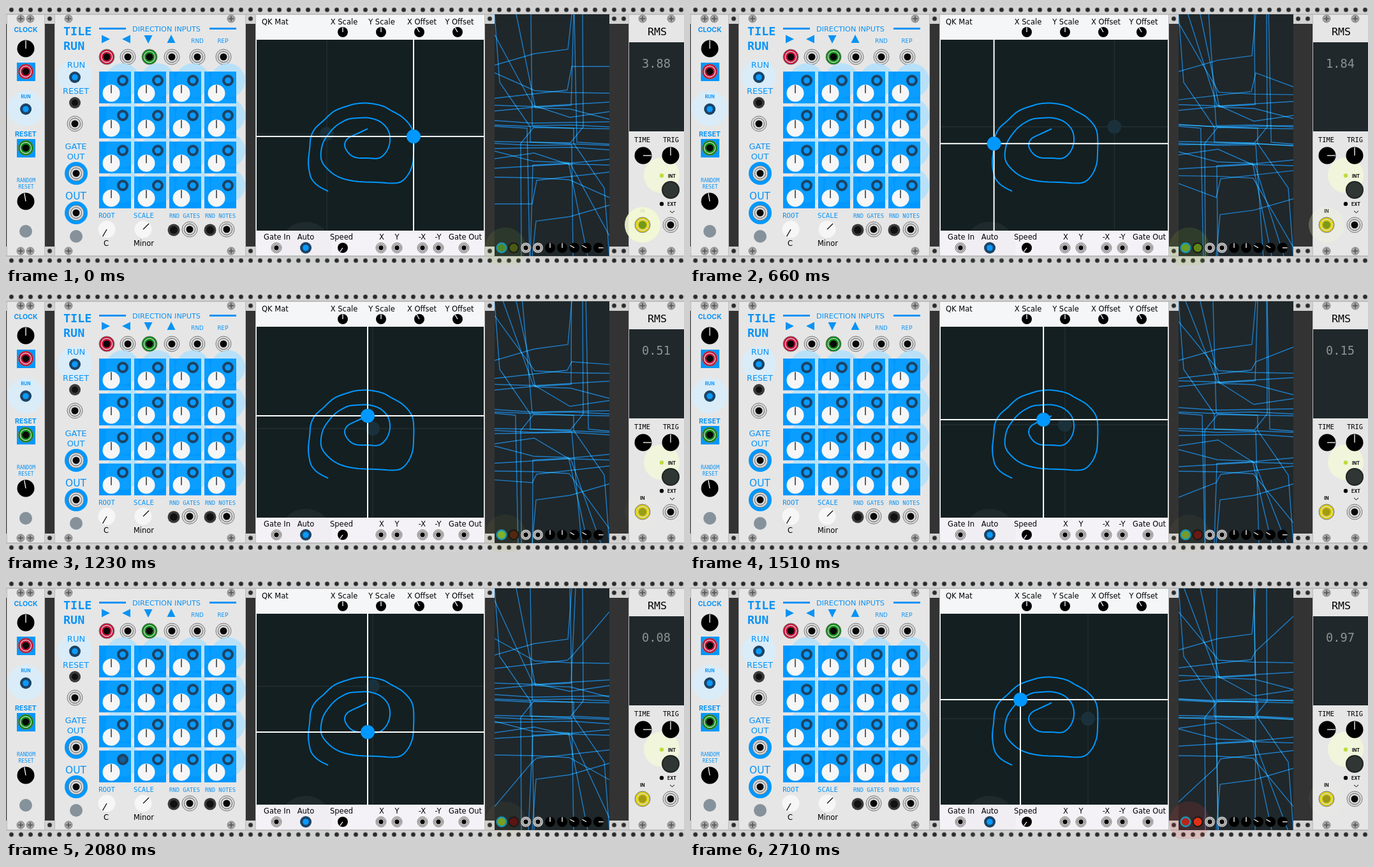
These frames come from a looping animation (1063x407 px, 2.81 s). An HTML page:

```html
<!DOCTYPE html>
<html lang="en">
<head>
<meta charset="utf-8">
<title>Modular rack</title>
<style>
html, body { margin: 0; width: 100%; height: 100%; overflow: hidden; background: #333; }
svg { display: block; width: 1063px; height: 407px; }
text { font-family: "DejaVu Sans", sans-serif; }
.mono { font-family: "DejaVu Sans Mono", monospace; }
.bold { font-weight: 700; }
.geo { font-family: Inter, sans-serif; font-weight: 700; }
#traces path { fill: none; stroke: #2094f0; stroke-width: 1.4; stroke-opacity: .78; mix-blend-mode: screen; }
#traces { isolation: isolate; }
</style>
</head>
<body>
<svg id="stage" viewBox="0 0 1063 407">
  <defs><clipPath id="scopeClip"><rect x="766" y="13" width="180" height="380"/></clipPath></defs>
</svg>
<script>
const NS = "http://www.w3.org/2000/svg";
const stage = document.getElementById("stage");
const BLUE = "#0098ff", INK = "#0a93f5", PANEL = "#e6e6e6";

// ---- drawing helpers ----
function el(tag, attrs, parent = stage) {
  const node = document.createElementNS(NS, tag);
  for (const k in attrs) node.setAttribute(k, attrs[k]);
  parent.appendChild(node);
  return node;
}
const rect = (x, y, width, height, fill) => el("rect", { x, y, width, height, fill });
const dot = (cx, cy, r, fill, more = {}) => el("circle", { cx, cy, r, fill, ...more });
const ring = (cx, cy, r, stroke, w = 1) => dot(cx, cy, r, "none", { stroke, "stroke-width": w });
const line = (x1, y1, x2, y2, stroke, w = 1) => el("line", { x1, y1, x2, y2, stroke, "stroke-width": w });

function label(str, x, y, size, fill = INK, cls = "", anchor = "middle") {
  const node = el("text", { x, y, fill, "font-size": size, class: cls, "text-anchor": anchor });
  node.textContent = str;
  return node;
}
function port(x, y, r = 12, fill = "#dcdcdc") {
  dot(x, y, r, fill, { stroke: "#777", "stroke-width": 1 });
  ring(x, y, r * .72, fill === "#dcdcdc" ? "#777" : "#ddd", 1.2);
  return dot(x, y, r * .46, "#080808");
}
function knob(x, y, r, deg, fill = "#000", hand = "#fff") {
  const a = deg * Math.PI / 180;
  dot(x, y, r, fill);
  line(x, y, x + Math.sin(a) * r * .95, y - Math.cos(a) * r * .95, hand, 1.3);
}
function led(x, y) {
  dot(x, y, 9, "#1c4364");
  return dot(x, y, 4.8, "#0a9aff");
}
function screw(x, y) {
  dot(x, y, 6, "#a3a3a3", { stroke: "#777", "stroke-width": .8 });
  line(x - 4, y, x + 4, y, "#555", 1.6);
  line(x, y - 4, x, y + 4, "#555", 1.6);
}
const glow = (x, y, r, fill, opacity) => dot(x, y, r, fill, { "fill-opacity": opacity });

// ---- rack ----
rect(0, 0, 1063, 407, "#333");
for (const [top, holes] of [[0, 6], [13, 20], [378, 385], [393, 400]]) {
  rect(0, top, 1063, 15, "#d2d2d2");
  for (let x = 8.5; x < 1063; x += 15) dot(x, holes, 3.6, "#2b2b2b", { stroke: "#999", "stroke-width": .6 });
}
line(0, 13, 1063, 13, "#a8a8a8");
line(0, 393, 1063, 393, "#a8a8a8");
function panel(x, w, fill = PANEL) {
  el("rect", { x: x + .5, y: 13.5, width: w - 1, height: 379, fill, stroke: "#bdbdbd" });
}

// ---- clock ----
panel(1, 60);
for (const y of [20, 385]) { screw(23, y); screw(38, y); }
label("CLOCK", 31, 41, 10.6, INK, "geo");
knob(31, 67, 13.5, 0);
rect(17, 89, 29, 29, BLUE);
port(31, 103, 12, "#c8143c");
glow(31, 161, 28, "#d8eefc", .85);
label("RUN", 31, 145, 7, INK, "geo");
led(31, 162);
label("RESET", 31, 205, 10.6, INK, "geo");
rect(17, 209, 29, 29, BLUE);
port(31, 223, 12, "#0c8a14");
label("RANDOM", 31.5, 277, 8, INK, "mono");
label("RESET", 31.5, 287, 8, INK, "mono");
knob(31, 307, 13.5, -10);
dot(31, 354, 10, "#86929b");

// ---- grid sequencer ----
panel(76, 300);
for (const y of [20, 385]) { screw(98, y); screw(353, y); }
label("TILE", 90, 46, 18.4, INK, "mono bold", "start");
label("RUN", 90, 69, 18.4, INK, "mono bold", "start");
label("DIRECTION INPUTS", 251.5, 40, 11.3);
line(146, 35.5, 188, 35.5, INK, 3);
line(319, 35.5, 361, 35.5, INK, 3);
[[156, 90], [189, -90], [223, 180], [259, 0]].forEach(([x, a]) =>
  el("path", { d: "M0-7L6.5 6H-6.5Z", fill: INK, transform: `translate(${x} 52) rotate(${a})` }));
label("RND", 300, 58, 8.8);
label("REP", 340, 58, 8.8);
port(158, 80, 12, "#c8143c");
port(225, 80, 12, "#0c8a14");
[191, 260, 300, 341].forEach(x => port(x, 80));

glow(108, 111, 27, "#d8eefc", .85);
label("RUN", 110, 97, 13);
led(108, 112);
label("RESET", 109.5, 138, 12.8);
dot(108, 152, 9, "#3a3a3a");
dot(108, 152, 5, "#111");
port(108, 185);
label("GATE", 109.5, 225, 13);
label("OUT", 109.5, 241, 13);
label("OUT", 109.5, 304, 15.4);
for (const y of [263, 325]) { dot(110, y, 18, BLUE); port(110, y); }
dot(110, 362, 10, "#86929b");

const cells = [];
for (let j = 0; j < 4; j++) for (let i = 0; i < 4; i++) cells.push([55 * i, 55 * j]);
cells.forEach(([x, y]) => glow(183 + x, 117 + y, 27, "#d8eefc", .8));
cells.forEach(([x, y]) => rect(146 + x, 103 + y, 50, 50, BLUE));
cells.forEach(([x, y]) => glow(183 + x, 117 + y, 27, "#30b4ff", .2));
const leds = cells.map(([x, y]) => {
  knob(165 + x, 137 + y, 13.5, 0, "#f6f6f6", "#111");
  return led(183 + x, 117 + y);
});
label("ROOT", 158, 333, 10.7, INK, "mono");
label("SCALE", 216, 333, 10.6, INK, "mono");
label("RND GATES", 280, 333, 8.9, INK, "mono");
label("RND NOTES", 336, 333, 8.9, INK, "mono");
knob(158, 351, 13.5, 210, "#f6f6f6", "#111");
knob(215, 351, 13.5, 45, "#f6f6f6", "#111");
label("C", 157, 377, 11.5, "#000");
label("Minor", 216, 377, 11.5, "#000");
for (const x of [263, 320]) { dot(x, 352, 9.5, "#3a3a3a"); dot(x, 352, 6, "#111"); }
port(288, 351);
port(346, 351);

// ---- touch pad ----
panel(391, 360, "#f5f6f7");
rect(393, 53, 356, 300, "#141f21");
rect(393, 353, 356, 39, "#f5f2f7");
label("QK Mat", 401, 29, 11.5, "#000", "", "start");
[["X Scale", 530, 528, 0], ["Y Scale", 589, 588, 0], ["X Offset", 652, 648, -30], ["Y Offset", 711, 708, -30]]
  .forEach(([str, x, kx, a]) => { label(str, x, 29, 11.5, "#000"); knob(kx, 41, 8, a); });
glow(470, 380, 41, "#aab4b8", .07);
[["Gate In", 425], ["Auto", 470], ["Speed", 526], ["X", 589], ["Y", 613], ["-X", 652.5], ["-Y", 677.5], ["Gate Out", 720]]
  .forEach(([str, x]) => label(str, x, 367, 11.5, "#000"));
[424, 588, 613, 653, 678, 718].forEach(x => port(x, 380, 8));
led(470, 380);
knob(528, 380, 8, 215);

const spiral = [
  567,193, 552,200, 536,208, 531,219, 537,231, 548,238, 567,239, 585,239, 597,228, 602,212,
  599,195, 587,182, 570,176, 552,176, 536,178, 518,188, 505,202, 496,218, 494,240, 503,255,
  520,268, 545,275, 580,277, 614,278, 629,267, 637,250, 639,232, 639,205, 635,190, 622,175,
  605,165, 590,157, 570,153, 553,153, 539,156, 515,165, 498,180, 485,192, 478,206, 476,225,
  474,245, 476,262, 480,273, 490,283, 505,291];
const LAST = spiral.length / 2 - 1;

// point on the Catmull-Rom curve at a fractional index
function along(u) {
  const i = Math.min(LAST - 1, Math.floor(u)), f = u - i;
  return [0, 1].map(c => {
    const p = n => spiral[2 * Math.max(0, Math.min(LAST, n)) + c];
    const [a, b, d, e] = [p(i - 1), p(i), p(i + 1), p(i + 2)];
    return b + f / 2 * (d - a + f * (2 * a - 5 * b + 4 * d - e + f * (3 * (b - d) + e - a)));
  });
}
const ghostX = line(0, 53, 0, 353, "#222e30", 1.5), ghostY = line(393, 0, 749, 0, "#222e30", 1.5);
const ghost = dot(0, 0, 11, "#1a313b");
let d = "M";
for (let u = 0; u <= LAST; u += .25) d += along(u).map(v => v.toFixed(1)) + " ";
el("path", { d, fill: "none", stroke: BLUE, "stroke-width": 2, "stroke-linejoin": "round" });
const crossX = line(0, 53, 0, 353, "#fff", 2), crossY = line(393, 0, 749, 0, "#fff", 2);
const ball = dot(0, 0, 11, BLUE);

// ---- scope ----
rect(766, 13, 180, 380, "#1f272a");
const traces = el("g", { id: "traces", "clip-path": "url(#scopeClip)" });
const half = el("path", {}, traces);
const strands = Array.from({ length: 24 }, (_, i) =>
  el("path", i % 2 ? { transform: "rotate(180 856 203)" } : {}, traces));
half.remove();
const scopeGlow = glow(783, 380, 32, "#9c3", .1);
dot(777, 380, 8.5, "#1798b4");
const lampA = dot(777, 380, 6, "#000");
dot(796, 380, 8.5, "#181a14");
const lampB = dot(796, 380, 6.5, "#000");
port(815, 380, 8);
port(834, 380, 8);
[0, 0, -60, -60, 90].forEach((a, i) => knob(853 + 19 * i, 380, 8, a));

// ---- level meter ----
panel(976, 90);
for (const y of [20, 385]) { screw(998, y); screw(1043, y); }
label("RMS", 1021, 46, 16.6, "#000", "mono");
rect(977, 57, 86, 140, "#20282b");
const readout = label("", 997, 97, 18.7, "#8d9293", "mono", "start");
label("TIME", 997.5, 214, 10.4, "#000", "mono");
label("TRIG", 1042.5, 214, 10.4, "#000", "mono");
glow(1028, 266, 28, "#f2f8dc", .9);
knob(999, 235, 13.5, 90);
knob(1042, 235, 13.5, 0);
dot(1028, 266.5, 3.2, "#bcdc3c");
dot(1028, 311, 3.2, "#000");
label("INT", 1044, 270, 7, "#000", "geo");
label("EXT", 1044, 314, 7, "#000", "geo");
label("IN", 998, 325, 7, "#000", "geo");
dot(1042, 289, 14, "#1e2421");
dot(1042, 289, 12, "#2f3633");
el("path", { d: "M1041 322l3.5 3 3.5-3", fill: "none", stroke: "#000" });
const inGlow = glow(998, 344, 28, "#f4fad4", 1);
port(998, 344, 12, "#d8cc10");
const inCore = dot(998, 344, 6, "#000");
port(1042, 344);

// ---- motion ----
const LOOP = 2810;
const times = [0, 360, 950, 1510, 2080, 2420, 2710];
const shortSteps = [13, 17, 19, 22, 25, 28, 31, 34, 36, 40, 44];
const starts = [0];
for (let k = 0; k < 47; k++) starts.push(starts[k] + (shortSteps.includes(k) ? 50 : 60));

// monotone cubic through keys
function ease(t, ts, vs) {
  let i = 0;
  while (i < ts.length - 2 && t >= ts[i + 1]) i++;
  const rate = n => (vs[n + 1] - vs[n]) / (ts[n + 1] - ts[n]);
  const slope = n => {
    if (n === 0) return rate(0);
    if (n === ts.length - 1) return rate(n - 1);
    const a = rate(n - 1), b = rate(n);
    return a * b > 0 ? 2 * a * b / (a + b) : 0;
  };
  const h = ts[i + 1] - ts[i], f = (t - ts[i]) / h, g = 1 - f;
  return g * g * ((1 + 2 * f) * vs[i] + f * h * slope(i))
       + f * f * ((1 + 2 * g) * vs[i + 1] - g * h * slope(i + 1));
}
const level = [3.88, 2.70, 1.13, .15, .08, .36, .97];

const RESTART = 1230;
function position(t) {
  return along(t < RESTART
    ? ease(t, [0, 360, 950, RESTART], [27, 34, 42, 44])
    : ease(t, [RESTART, ...times.slice(3)], [0, .87, 6, 10.25, 15]));
}

// scope levels: top, mid, upper flat, lower flat, left end, left post, right post, right end, box
const shape = [
  [75, 80, 88, 88, 100, 66, 92],
  [133, 148, 123, 122, 127, 110, 126],
  [156, 157, 151, 138, 162, 150, 150],
  [180, 186, 186, 180, 180, 186, 187],
  [105, 25, 30, 45, 92, 115, 50],
  [823, 827, 800, 820, 822, 829, 826],
  [890, 886, 884, 890, 893, 886, 884],
  [95, 120, 130, 85, 50, 72, 57],
  [815, 806, 795, 801, 822, 830, 822]];

function drawTraces(t) {
  const [a, b, c, e, l, p, q, r, s] = shape.map(v => ease(t, times, v));
  [
    [766, a + 18, 828, a, 881, a - 7, 887, 13],
    [766, l, 829, b, 884, b + 3, 946, b + 4],
    [766, b + 12, 880, b - 1, 887, a + 20, 946, r],
    [p, 13, 825, 188, 885, 187, 946, 190],
    [q, 13, 886, c, 829, c + 3, 766, c + 9],
    [766, c, 830, c + 2, 946, c - 5],
    [766, e, 825, e + 4, 946, e + 2],
    [800, 13, 830, c + 4, 885, c + 6, 946, c + 22],
    [904, 13, 905, 190, 885, 215, 766, 213],
    [766, 13, 774, 120, 822, 190, 822, 214, 946, 219],
    [s + 6, 393, s + 2, 192, 766, 189],
    [766, l - 60, 826, c, 884, e - 5, 946, e - 14]
  ].forEach((pts, i) => {
    const path = "M" + pts.map(v => v.toFixed(1)).join(" ");
    strands[2 * i].setAttribute("d", path);
    strands[2 * i + 1].setAttribute("d", path);
  });
}

const rgb = keys => {
  const channels = [16, 8, 0].map(shift => keys.map(k => k >> shift & 255));
  return t => `rgb(${channels.map(v => Math.round(ease(t, times, v)))})`;
};
const colorA = rgb([0x4f8a2a, 0x4a701c, 0x8ac92a, 0x7a9a28, 0x7aa020, 0xd8281c, 0xb8241c]);
const colorB = rgb([0x4a5a14, 0x84b81e, 0x3c4410, 0x6a1a14, 0x5a1512, 0x5a1512, 0xe03018]);
const colorGlow = rgb([0xa0c83c, 0x98cc30, 0xa0c830, 0xc0a040, 0xc8a050, 0xf04848, 0xf04040]);
const colorIn = rgb([0x6f9a1c, 0x76921a, 0x88a01c, 0xa39a16, 0xa39a16, 0xa39a16, 0x98981a]);

const set = (node, attrs) => { for (const k in attrs) node.setAttribute(k, attrs[k]); };

function pose(t) {
  const [x, y] = position(t), gx = 1142 - x, gy = 406 - y;
  set(ball, { cx: x, cy: y });
  set(ghost, { cx: gx, cy: gy });
  set(crossX, { x1: x, x2: x });
  set(crossY, { y1: y, y2: y });
  set(ghostX, { x1: gx, x2: gx });
  set(ghostY, { y1: gy, y2: gy });
  drawTraces(t);
  readout.textContent = ease(t, times, level).toFixed(2);
  set(lampA, { fill: colorA(t) });
  set(lampB, { fill: colorB(t) });
  set(scopeGlow, { fill: colorGlow(t), "fill-opacity": ease(t, times, [.1, .15, .1, .06, .06, .12, .15]) });
  set(inCore, { fill: colorIn(t) });
  set(inGlow, { "fill-opacity": ease(t, times, [.9, .5, .08, 0, 0, 0, .04]) });
  set(leds[12], { "fill-opacity": t >= 2080 && t < 2190 ? .3 : 1 });
}

let shown = -1;
function tick(now) {
  const t = now % LOOP;
  let k = starts.length - 1;
  while (starts[k] > t) k--;
  if (k !== shown) pose(starts[shown = k]);
  requestAnimationFrame(tick);
}
pose(0);
requestAnimationFrame(() => tick(performance.now()));
</script>
</body>
</html>
```
